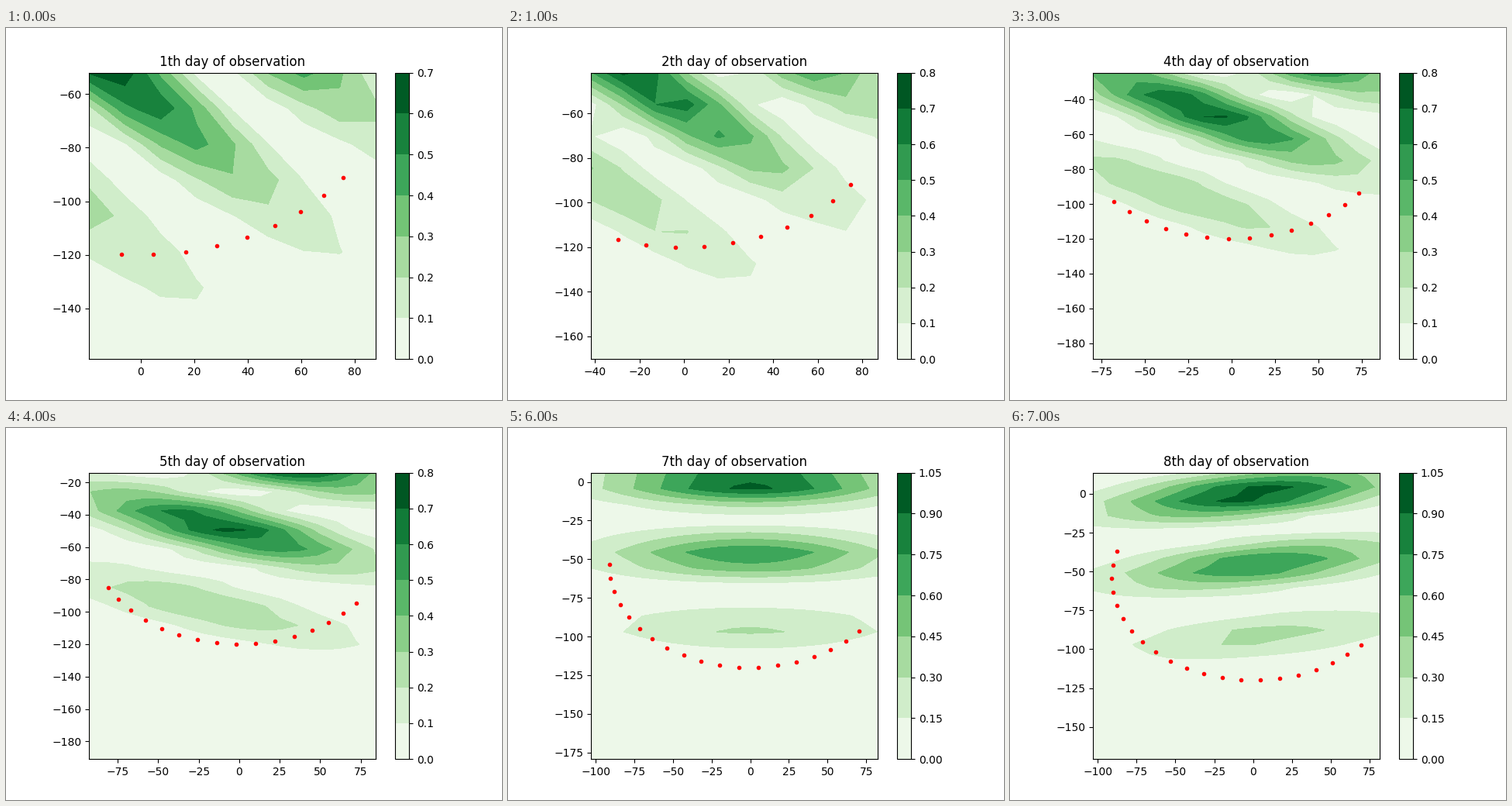
A matplotlib script for the animation above (8000 ms loop, 640x480 px).

```python
import numpy as np
import matplotlib.pyplot as plt
from matplotlib.animation import FuncAnimation

DAYS = 8
MARGIN = 12

fig = plt.figure(figsize=(6.4, 4.8), dpi=100)


def track(k):
    """Points on the elliptical track covered on day k (from 0)."""
    last, first = 56.35 - 0.96 * k, -4.6 - 14.47 * k
    n = int((last - first) / 7.6) + 1
    angle = np.radians(np.linspace(last, first, n))
    return 91 * np.sin(angle), -55 - 65 * np.cos(angle)


def fringes(x, y, k):
    """Fringe pattern under a round envelope; it turns from day to day."""
    p = 0.0130 - 0.00215 * k
    q = 0.0164 + 0.00075 * k - 0.000006 * k**2
    r2 = x**2 + y**2
    envelope = np.exp(-r2 / 7800 + (r2 / 39200) ** 2)
    return envelope * (0.03 + 0.97 * np.cos(np.pi * (p * x + q * y)) ** 2)


def levels(k):
    if k == 0:
        return np.linspace(0, 0.7, 8)
    if k < 5:
        return np.linspace(0, 0.8, 9)
    return np.linspace(0, 1.05, 8)


def draw(k):
    fig.clear()
    ax = fig.add_subplot()
    u, v = track(k)
    cx, cy = (u.min() + u.max()) / 2, (v.min() + v.max()) / 2
    half = max(np.ptp(u), np.ptp(v)) / 2 + MARGIN
    side = np.linspace(-half, half, len(u))
    x, y = np.meshgrid(cx + side, cy + side)

    filled = ax.contourf(x, y, fringes(x, y, k), levels=levels(k), cmap="Greens")
    ax.plot(u, v, "r.")
    ax.set_xlim(cx - half, cx + half)
    ax.set_ylim(cy - half, cy + half)
    ax.set_aspect("equal")
    ax.set_title(f"{k + 1}th day of observation")
    fig.colorbar(filled, ax=ax)
    return []


anim = FuncAnimation(fig, draw, frames=DAYS, init_func=lambda: [],
                     interval=1000, repeat=True, repeat_delay=0)
plt.show()
```
